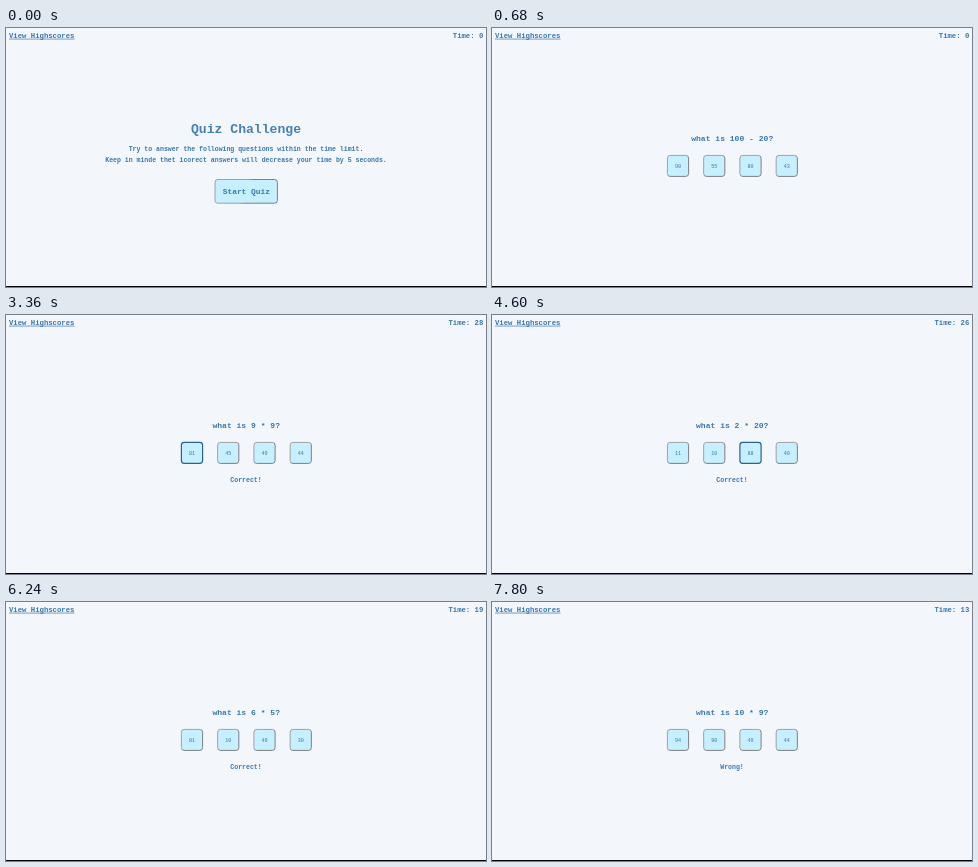
An HTML page with a canvas for the animation above (8 s loop, 480x259 px).

```html
<!DOCTYPE html>
<html lang="en">
<head>
<meta charset="utf-8">
<title>Quiz</title>
<style>
html, body { margin: 0; width: 100%; height: 100%; overflow: hidden; background: #f3f7fc; }
canvas { display: block; width: 480px; height: 259px; }
</style>
</head>
<body>
<canvas id="stage"></canvas>
<script>
const W = 480, H = 259, LOOP = 8000;
const INK = '#3a76ab', TITLE_INK = '#4580b2', FILL = '#c6efff';
const canvas = document.getElementById('stage');
const ctx = canvas.getContext('2d');
const ratio = window.devicePixelRatio || 1;
canvas.width = Math.round(W * ratio);
canvas.height = Math.round(H * ratio);

// Each entry holds from its start time until the next one.
const questions = [
  { at: 680, ask: '100 - 20', options: [90, 55, 80, 43], result: '' },
  { at: 1960, ask: '9 * 9', options: [81, 45, 49, 44], result: 'Correct!' },
  { at: 3520, ask: '2 * 20', options: [11, 10, 88, 40], result: 'Correct!' },
  { at: 4800, ask: '5 * 8', options: [35, 40, 48, 64], result: 'Wrong!' },
  { at: 5760, ask: '6 * 5', options: [81, 10, 49, 30], result: 'Correct!' },
  { at: 6800, ask: '7 * 6', options: [36, 48, 54, 42], result: 'Wrong!' },
  { at: 7800, ask: '10 * 9', options: [94, 90, 49, 44], result: 'Wrong!' }
];
const clock = [
  { at: 0, left: 0 }, { at: 1600, left: 29 }, { at: 2560, left: 28 },
  { at: 3480, left: 27 }, { at: 4360, left: 26 }, { at: 5280, left: 20 },
  { at: 6240, left: 19 }, { at: 7120, left: 13 }
];
const presses = [
  { from: 1760, to: 1960, index: 2 }, { from: 3360, to: 3520, index: 0 },
  { from: 4600, to: 4800, index: 2 }, { from: 5680, to: 5760, index: 1 },
  { from: 6640, to: 6800, index: 2 }, { from: 7760, to: 7800, index: 2 }
];

const current = (list, t) => list.filter(item => item.at <= t).pop();

function label(str, x, y, size, align = 'center', weight = 'bold', color = INK) {
  ctx.font = `${weight} ${size}px "Liberation Mono", "Courier New", monospace`;
  ctx.textAlign = align;
  ctx.textBaseline = 'alphabetic';
  ctx.fillStyle = color;
  ctx.fillText(str, x, y);
}

function box(x, y, w, h, r) {
  ctx.beginPath();
  ctx.roundRect(x, y, w, h, r);
}

function button(x, y, w, h, focused) {
  box(x, y, w, h, 2.8);
  ctx.fillStyle = FILL;
  ctx.fill();
  const edge = ctx.createLinearGradient(x, y, x + w, y + h);
  edge.addColorStop(0.45, '#9a9694');
  edge.addColorStop(0.55, '#77706f');
  ctx.strokeStyle = focused ? '#286487' : edge;
  ctx.lineWidth = focused ? 1.2 : 0.9;
  ctx.stroke();
}

function drawHeader(t) {
  label('View Highscores', 3, 10, 7.28, 'left');
  ctx.fillStyle = INK;
  ctx.fillRect(3, 10.7, 65.5, 0.7);
  label('Time: ' + current(clock, t).left, 477.3, 10, 7.28, 'right');
}

function drawIntro(t) {
  label('Quiz Challenge', 240, 105, 13.1, 'center', 'bold', TITLE_INK);
  label('Try to answer the following questions within the time limit.', 240, 123.2, 6.53);
  label('Keep in minde thet icorect answers will decrease your time by 5 seconds.', 240, 134, 6.53);
  button(209, 151.5, 62.4, 23.7, t >= 600);
  label('Start Quiz', 240.3, 165.6, 7.85);
}

function drawQuestion(q, t) {
  label(`what is ${q.ask}?`, 240.2, 113.2, 8.05);
  const press = presses.find(p => t >= p.from && t < p.to);
  q.options.forEach((value, i) => {
    const x = 175.4 + i * 36.25;
    button(x, 127.4, 21.2, 21, press && press.index === i);
    label(value, x + 10.6, 139.7, 5.1, 'center', 'normal');
  });
  label(q.result, 240, 166.6, 6.53);
}

function draw(t) {
  ctx.setTransform(ratio, 0, 0, ratio, 0, 0);
  ctx.fillStyle = '#f3f7fc';
  ctx.fillRect(0, 0, W, H);
  drawHeader(t);
  const q = current(questions, t);
  if (q) drawQuestion(q, t);
  else drawIntro(t);
  ctx.fillStyle = '#000';
  ctx.fillRect(0, 258, W, 1);
}

const start = performance.now();
function tick() {
  draw((performance.now() - start) % LOOP);
  requestAnimationFrame(tick);
}
tick();
</script>
</body>
</html>
```
